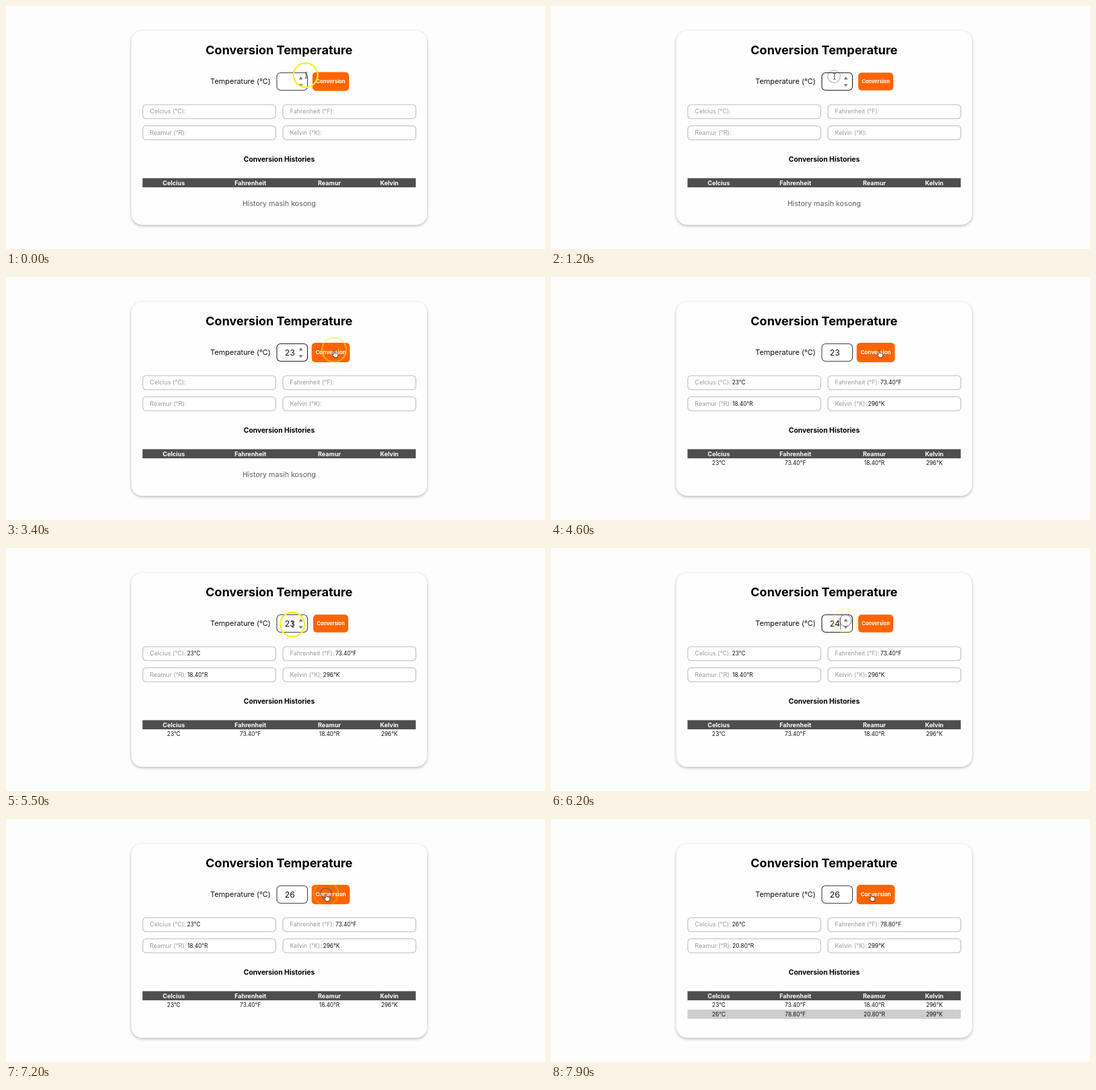
Write an HTML page with a canvas that moves like this. It is 800 px wide and 362 px high and loops after 8000 ms.

```html
<!DOCTYPE html>
<html lang="en">
<head>
<meta charset="utf-8">
<title>Conversion Temperature</title>
<style>
html, body { margin: 0; width: 100%; height: 100%; overflow: hidden; background: #fdfdfd; }
canvas { display: block; width: 800px; height: 362px; }
</style>
</head>
<body>
<canvas id="stage"></canvas>
<script>
const W = 800, H = 362, LOOP = 8000;
const canvas = document.getElementById('stage');
const ctx = canvas.getContext('2d');
const dpr = window.devicePixelRatio || 1;
canvas.width = W * dpr;
canvas.height = H * dpr;

// the pointer glides to (x, y) between start and end
const MOVES = [
  { start: -200, end: 300, x: 420, y: 105 },
  { start: 2300, end: 3200, x: 487, y: 108.5 },
  { start: 4600, end: 5500, x: 425, y: 114 },
  { start: 5600, end: 5900, x: 437, y: 108 },
  { start: 6550, end: 6900, x: 475, y: 111 }
];
const CLICKS = [800, 3650, 5950, 6250, 6550, 7200];
const LABELS = ['Celcius', 'Fahrenheit', 'Reamur', 'Kelvin'];
const UNITS = ['°C', '°F', '°R', '°K'];
const CENTRES = [249, 362.7, 480, 569];
const TABLE = { x: 202.6, y: 256.5, w: 405.6, row: 13.6 };

const clamp = v => Math.min(1, Math.max(0, v));
const within = (v, a, b) => v >= a && v < b;
const easeOut = k => 1 - (1 - k) ** 2;

function pointerAt(t) {
  const p = { x: 489, y: 99.5 };
  for (const m of MOVES) {
    const k = easeOut(clamp((t - m.start) / (m.end - m.start)));
    p.x += (m.x - p.x) * k;
    p.y += (m.y - p.y) * k;
  }
  return p;
}

const onButton = t => pointerAt(t).x >= 455;
const clicksBy = t => CLICKS.filter(c => c <= t);
const focused = t => clicksBy(t).length > 0 && !onButton(clicksBy(t).pop());
const typing = t => within(t, 1500, 2400);

// two typed digits, then one step per click on the spinner
function valueAt(t) {
  if (t < 1900) return t < 1500 ? '' : '2';
  const steps = clicksBy(t - 50).filter(c => c > 1900 && !onButton(c)).length;
  return String(23 + steps);
}

function historyAt(t) {
  return clicksBy(t - 350).filter(onButton).map(c => {
    const n = Number(valueAt(c));
    return [n, (n * 1.8 + 32).toFixed(2), (n * 0.8).toFixed(2), n + 273].map((v, i) => v + UNITS[i]);
  });
}

function haloAt(t) {
  const fades = MOVES.map(m => Math.min(clamp((t - m.start) / 100), clamp(1 - (t - m.end) / 400)));
  return Math.max(...fades);
}

// hover growth follows how long the pointer has been over the button
function growthAt(t) {
  const n = 20, span = 200;
  let over = 0;
  for (let i = 0; i < n; i++) over += onButton(t - i * span / n) / n;
  return 1 + 0.09 * over ** 2;
}

function text(str, x, y, size, { weight = 400, color = '#111', align = 'left' } = {}) {
  ctx.font = `${weight} ${size}px Inter, "Open Sans", sans-serif`;
  ctx.textAlign = align;
  ctx.fillStyle = color;
  ctx.fillText(str, x, y);
  return ctx.measureText(str).width;
}

function rect(x, y, w, h, color) {
  ctx.fillStyle = color;
  ctx.fillRect(x, y, w, h);
}

function box(x, y, w, h, r, fill, stroke) {
  ctx.beginPath();
  ctx.roundRect(x, y, w, h, r);
  ctx.fillStyle = fill;
  ctx.fill();
  if (!stroke) return;
  ctx.strokeStyle = stroke;
  ctx.lineWidth = 1.1;
  ctx.stroke();
}

function ring(p, r, color, line, alpha) {
  ctx.globalAlpha = alpha;
  ctx.beginPath();
  ctx.arc(p.x, p.y, r, 0, Math.PI * 2);
  ctx.strokeStyle = color;
  ctx.lineWidth = line;
  ctx.stroke();
  ctx.globalAlpha = 1;
}

function triangle(x, y, dir) {
  ctx.beginPath();
  ctx.moveTo(x - 3, y + 2 * dir);
  ctx.lineTo(x + 3, y + 2 * dir);
  ctx.lineTo(x, y - 2.3 * dir);
  ctx.fillStyle = '#7d7d7d';
  ctx.fill();
}

function card() {
  ctx.save();
  ctx.shadowColor = 'rgba(0,0,0,.28)';
  ctx.shadowBlur = 4 * dpr;
  ctx.shadowOffsetY = 1.5 * dpr;
  box(186, 37, 439, 289, 16, '#fefefe');
  ctx.restore();
  text('Conversion Temperature', 405.3, 71.6, 18, { weight: 700, color: '#000', align: 'center' });
}

function entry(t) {
  const value = valueAt(t);
  text('Temperature (°C)', 303.3, 116.2, 10.9);
  box(402, 99.5, 45.5, 26, 5.5, '#fff', focused(t) ? '#222' : '#444');
  text(value, 421.2, 116.9, 12.2, { align: 'center' });
  if (focused(t) || within(pointerAt(t).x, 402, 447.5)) {
    triangle(437.6, 107.4, 1);
    triangle(437.6, 118.2, -1);
  }
  if (typing(t) || (focused(t) && t > 4000)) {
    rect(421.5 + 3.8 * value.length, 104, 0.8, 17, '#555');
  }
}

function button(t) {
  const s = growthAt(t);
  ctx.save();
  ctx.translate(482, 112.5);
  ctx.scale(s, s);
  box(-26, -13.3, 52, 26.6, 5, '#ff6400');
  text('Conversion', 0, 2.7, 7.4, { weight: 700, color: '#fff', align: 'center' });
  ctx.restore();
}

function fields(current) {
  LABELS.forEach((name, i) => {
    const x = 203 + 208 * (i % 2), y = 147 + 31.5 * Math.floor(i / 2);
    box(x, y, 197.3, 20.8, 5, '#fff', '#bdbdbd');
    const w = text(`${name} (${UNITS[i]}):`, x + 10.6, y + 13.4, 8.95, { color: '#999' });
    if (current) text(current[i], x + 12.4 + w, y + 13.4, 8.3);
  });
}

function table(rows) {
  const { x, y, w, row } = TABLE;
  text('Conversion Histories', 405.5, 231.7, 10.3, { weight: 700, color: '#000', align: 'center' });
  rect(x, y, w, row, '#4e4e4e');
  if (rows.length > 1) rect(x, y + 2 * row + 0.3, w, row, '#cdcdcd');
  LABELS.forEach((name, i) => {
    text(name, CENTRES[i], y + 10, 9, { weight: 700, color: '#fff', align: 'center' });
    rows.forEach((r, n) => text(r[i], CENTRES[i], y + 10 + (n + 1) * row, 8.3, { align: 'center' }));
  });
  if (!rows.length) text('History masih kosong', 405.4, 298.3, 10.7, { color: '#5c5c5c', align: 'center' });
}

const HAND = new Path2D('M-.8 1.2Q.2 0 1 1.2V5Q2 4.2 2.7 5.2Q3.8 4.6 4.3 5.7Q5.8 5.3 5.9 7Q6 9 4.8 10.3V11.6H-.2V10.6L-3 7.2Q-3 5.6-.8 7.2Z');
const BEAM = new Path2D('M-1.8-4.5Q0-4.5 0-3.2Q0-4.5 1.8-4.5M0-3.5V3.5M-1.8 4.5Q0 4.5 0 3.2Q0 4.5 1.8 4.5');

function pointer(t) {
  const p = pointerAt(t);
  ring(p, 18, '#f7ee2e', 2.3, haloAt(t));

  const click = clicksBy(t).pop();
  const age = (t - click) / 800;
  if (age < 1) ring(pointerAt(click), 8 + 2.5 * age, '#5b5468', 1.6, 0.7 * (1 - age));

  if (typing(t) || within(p.x, 432, 442)) return;
  ctx.save();
  ctx.translate(p.x, p.y);
  ctx.lineJoin = 'round';
  ctx.strokeStyle = '#222';
  ctx.lineWidth = 0.8;
  if (onButton(t)) {
    ctx.fillStyle = '#fff';
    ctx.fill(HAND);
    ctx.stroke(HAND);
  } else {
    ctx.translate(0.7, 0);
    ctx.stroke(BEAM);
  }
  ctx.restore();
}

const start = performance.now();
function draw() {
  const t = (performance.now() - start) % LOOP;
  const rows = historyAt(t);
  ctx.setTransform(dpr, 0, 0, dpr, 0, 0);
  rect(0, 0, W, H, '#fdfdfd');
  card();
  entry(t);
  button(t);
  fields(rows[rows.length - 1]);
  table(rows);
  pointer(t);
  requestAnimationFrame(draw);
}
draw();
</script>
</body>
</html>
```
